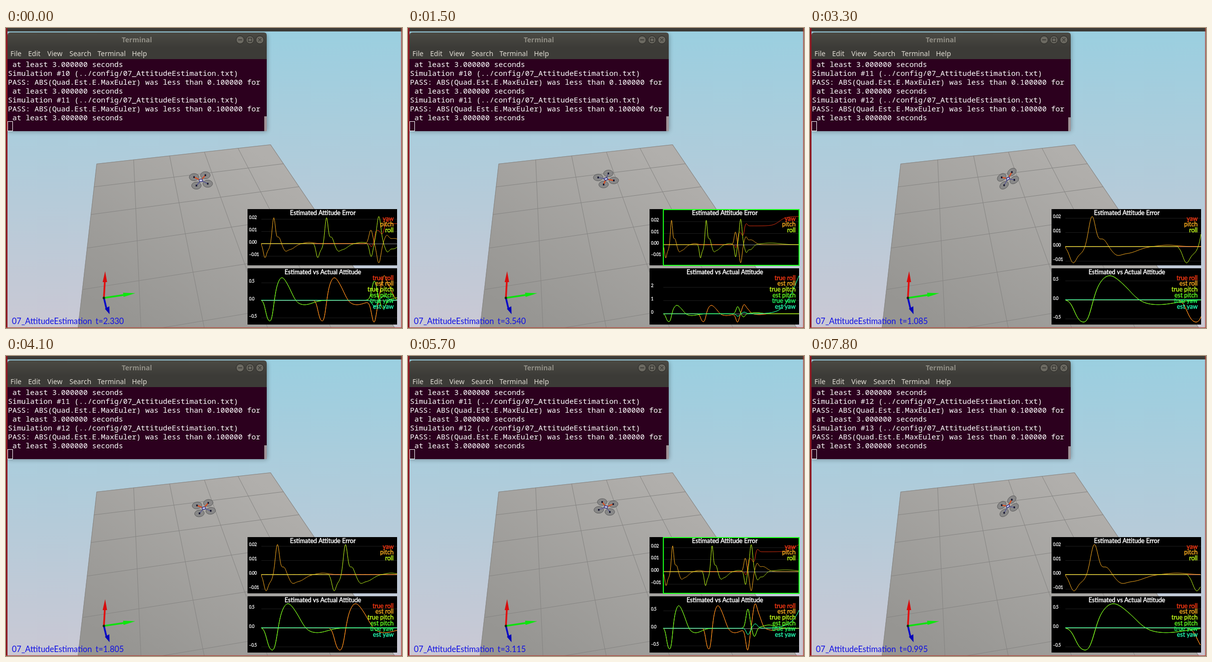
An HTML page with a canvas that plays this animation: 805x608 px, repeating every 7.9 s.

```html
<!DOCTYPE html>
<html lang="en">
<head>
<meta charset="utf-8">
<title>Attitude estimation</title>
<style>
  html, body { margin: 0; width: 100%; height: 100%; overflow: hidden; background: #b4ccd8; }
  svg, canvas { position: absolute; left: 0; top: 0; width: 805px; height: 608px; }
  .ui { font: 14px "Noto Sans", sans-serif; fill: #dfdbd2; }
  .title { font-weight: 700; fill: #908e85; text-anchor: middle; }
  .term text { font: 15px "Noto Sans Mono", monospace; fill: #fff; white-space: pre; }
</style>
</head>
<body>
<svg viewBox="0 0 805 608">
  <defs>
    <linearGradient id="sky" x2="0" y2="1">
      <stop stop-color="#9acfe0"/><stop offset="1" stop-color="#cac8d4"/>
    </linearGradient>
    <linearGradient id="floor" gradientUnits="userSpaceOnUse" x1="500" y1="240" x2="260" y2="608">
      <stop stop-color="#b1afac"/><stop offset="1" stop-color="#969592"/>
    </linearGradient>
    <linearGradient id="bar" x2="0" y2="1">
      <stop stop-color="#4b4a44"/><stop offset="1" stop-color="#3c3b37"/>
    </linearGradient>
    <filter id="shadow" x="-10%" y="-10%" width="120%" height="130%">
      <feGaussianBlur stdDeviation="5"/>
    </filter>
    <clipPath id="ground"><path d="M184 275L538 236L791 608H146Z"/></clipPath>
  </defs>
  <rect width="805" height="608" fill="url(#sky)"/>
  <g clip-path="url(#ground)" stroke="#868583" fill="none">
    <rect y="230" width="805" height="378" fill="url(#floor)" stroke="none"/>
    <path id="grid"/>
    <path d="M146 608L184 275L538 236L791 608" stroke-width="2"/>
  </g>
  <g stroke-width="3.5">
    <path d="M199 547L201 512" stroke="#e01010"/>
    <path d="M196.500 515L201.500 493L205.500 515Z" fill="#d80c0c"/>
    <path d="M199 547L204 568" stroke="#0808c8"/>
    <path d="M201 569L210.500 580L210 564Z" fill="#0404b8"/>
    <path d="M199 547L240 541" stroke="#10e010"/>
    <path d="M238 536.500L263 537.500L239 545Z" fill="#0ce80c"/>
  </g>
  <circle cx="199" cy="547" r="2.500" fill="#102810"/>

  <rect x="3" y="12" width="528" height="198" rx="5" fill="#000" opacity=".3" filter="url(#shadow)"/>
  <path d="M3 40V15Q3 9 9 9H524Q530 9 530 15V40Z" fill="url(#bar)"/>
  <rect x="3" y="39" width="527" height="24" fill="#3c3b37"/>
  <rect x="3" y="63" width="527" height="146" fill="#2c001e"/>
  <g fill="#6b6961" stroke="#33322e" stroke-width="1.300">
    <circle cx="476" cy="24" r="8"/><circle cx="496" cy="24" r="8"/><circle cx="516" cy="24" r="8"/>
    <path d="M472 24H480M492.500 20.500H499.500V27.500H492.500ZM513 21L519 27M519 21L513 27"/>
  </g>
  <text class="ui title" x="266" y="29">Terminal</text>
  <g class="ui">
    <text x="9" y="57">File</text><text x="45" y="57">Edit</text><text x="84" y="57">View</text>
    <text x="129" y="57">Search</text><text x="186" y="57">Terminal</text><text x="256" y="57">Help</text>
  </g>
  <g id="lines" class="term"></g>
  <rect x="3.500" y="189.500" width="10" height="19" fill="none" stroke="#fff"/>
  <rect id="thumb" x="525" y="179" width="5" height="30" fill="#a09498"/>
  <rect width="805" height="7" fill="#3c3b37"/>
  <path d="M1.500 0V608" stroke="#8c1620" stroke-width="3"/>
  <path d="M804 0V608M0 607.500H805" stroke="#b0483c" stroke-width="1.500"/>
</svg>
<canvas id="view" width="805" height="608"></canvas>
<script>
const LOOP = 7900, FRAME = 100;
const ctx = document.getElementById('view').getContext('2d');

// Floor grid in perspective; columns meet at (239, -204)
function floorGrid() {
  let d = '';
  for (let i = 1; i < 5; i++) {
    const x = (184 + 79.9 * i) / (1 + .017 * i), y = 275 - .11 * (x - 184);
    d += `M${x} ${y}L${x + (x - 239) / (y + 204) * (608 - y)} 608`;
  }
  for (let i = 1; i < 6; i++) {
    const depth = 1 - .0805 * i, left = (275 + 21.1 * i) / depth, right = (236 + 16.9 * i) / depth;
    d += `M${184 - .114 * (left - 275)} ${left}L${538 + .68 * (right - 236)} ${right}`;
  }
  return d;
}
document.getElementById('grid').setAttribute('d', floorGrid());

const bump = (t, centre, width, height) => height * Math.exp(-(((t - centre) / width) ** 2));
const rise = (t, centre, width, height) => height / 2 * (1 + Math.tanh((t - centre) / width));

// Response to one tilt manoeuvre: estimation error (1e-4 rad) and angle (rad)
const errPulse = t => t <= 0 ? 0 :
  bump(t, .062, .04, -112) + bump(t, .125, .04, -40) + bump(t, .214, .038, 211) +
  bump(t, .3, .045, 55) + bump(t, .41, .05, -30) + bump(t, .49, .12, -48) + bump(t, .82, .1, 10);
const tiltPulse = t => t <= 0 ? 0 :
  bump(t, .105, .055, -.42) + bump(t, .175, .055, -.52) + bump(t, .34, .12, .6) +
  bump(t, .48, .1, .22) + bump(t, .74, .2, -.13);

// Pitch manoeuvre, then roll, then a combined turn around t = 2
const pitchErr = t => 1e-4 * (errPulse(t) + bump(t, 1.88, .045, 110) + bump(t, 2.017, .05, -160) +
  bump(t, 2.15, .05, 50) + bump(t, 2.28, .14, 42));
const rollErr = t => 1e-4 * (errPulse(t - .905) + bump(t, 1.885, .04, -108) + bump(t, 2.017, .05, 222) +
  bump(t, 2.16, .05, -55) + bump(t, 2.27, .1, -45) + bump(t, 2.8, .35, 14));
const yawErr = t => 1e-4 * (bump(t, 1.89, .03, -26) + rise(t, 1.945, .02, 110) + bump(t, 2.07, .04, -32) +
  rise(t, 2.115, .02, 53) + bump(t, 2.165, .04, 20) + rise(t, 3.03, .17, 82));

const pitch = t => tiltPulse(t) + bump(t, 1.94, .06, .54) + bump(t, 2.09, .06, -.24) + bump(t, 2.42, .2, .09);
const roll = t => tiltPulse(t - .9) + bump(t, 1.935, .06, -.61) + bump(t, 2.1, .07, .62) +
  bump(t, 2.2, .08, .3) + bump(t, 2.5, .15, -.06);
const yaw = t => {
  const angle = bump(t, 1.945, .06, -.18) + bump(t, 2.11, .07, .12) + rise(t, 3.46, .33, 4.63);
  return angle > Math.PI ? angle - 2 * Math.PI : angle;
};

const droneX = t => 402.5 - bump(t, 2.25, .25, 7);
const droneY = t => 306 - bump(t, .5, .35, 11) + bump(t, 2.1, .4, 4);

// Simulated seconds; each run restarts the clock and slows down as plots fill
function playback(ms) {
  if (ms < 2100) return { run: 0, t: 2.33 + ms * 1.21 / 1500 };
  const run = ms < 6700 ? 1 : 2, s = (ms - (run === 1 ? 2100 : 6700)) / 1000;
  return { run, t: .005 + .9 * Math.min(s, 2) + .82 * Math.max(0, s - 2) };
}

function text(str, x, y, size, color, align = 'left', weight = .3) {
  ctx.font = `${size}px Lato, sans-serif`;
  ctx.textAlign = align;
  ctx.fillStyle = ctx.strokeStyle = color;
  ctx.fillText(str, x, y);
  if (weight) {
    ctx.lineWidth = weight;
    ctx.strokeText(str, x, y);
  }
}

function hline(y, color) {
  ctx.fillStyle = color;
  ctx.fillRect(519, Math.round(y), 276, 1);
}

const RED = '#ff3a14', ORANGE = '#ffb020', LIME = '#c4ff1c';
const errorPlot = {
  top: 367, title: 'Estimated Attitude Error',
  series: [['yaw', RED, yawErr], ['pitch', ORANGE, pitchErr], ['roll', LIME, rollErr]]
};
const attitudePlot = {
  top: 487, title: 'Estimated vs Actual Attitude',
  series: [
    ['true roll', RED, t => roll(t) - rollErr(t)], ['est roll', ORANGE, roll],
    ['true pitch', LIME, t => pitch(t) - pitchErr(t)], ['est pitch', '#62ff20', pitch],
    ['true yaw', '#1cff62', yaw], ['est yaw', '#24ffb4', yaw]
  ]
};

function tickStep(range) {
  let step = 1e-5;
  for (let i = 0; range / step > 6.4; i++) step *= i % 2 ? 2 : 5;
  return +step.toPrecision(1);
}

function drawPlot({ top, title, series }, now) {
  const times = [];
  for (let t = 0; t < now; t += .006) times.push(t);
  times.push(now);
  const data = series.map(([, , f]) => times.map(f));
  const all = data.flat();
  const min = Math.min(0, ...all), max = Math.max(0, ...all), range = Math.max(max - min, 1e-4);
  const toX = t => 519 + 276 * t / Math.max(now, 1);
  const toY = v => top + 109 - 94 * (v - min) / range;

  ctx.fillStyle = '#000';
  ctx.fillRect(491, top, 304, 114);
  const step = tickStep(range), digits = Math.max(0, -Math.floor(Math.log10(step) + 1e-9));
  ctx.letterSpacing = '-0.3px';
  for (let v = Math.ceil(min / step) * step; toY(v) > top + 12; v += step) {
    hline(toY(v), '#1c1c1c');
    text(v.toFixed(digits).replace('-', '–'), 494, toY(v), 8.5, '#fff');
  }
  ctx.letterSpacing = '0px';
  hline(toY(0), '#858585');

  ctx.save();
  ctx.beginPath();
  ctx.rect(491, top, 304, 114);
  ctx.clip();
  ctx.lineWidth = 1;
  ctx.lineJoin = 'round';
  data.forEach((values, i) => {
    ctx.strokeStyle = series[i][1];
    ctx.beginPath();
    values.forEach((v, j) => ctx.lineTo(toX(times[j]), toY(v)));
    ctx.stroke();
  });
  ctx.restore();

  text(title, 644, top + 12, 12.5, '#fff', 'center', .5);
  series.forEach(([name, color], i) => text(name, 788, top + 23.5 + 11.7 * i, 12.5, color, 'right', .4));
}

function drawDrone(t) {
  const mix = (a, p, b, q) => [a[0] * p + b[0] * q, a[1] * p + b[1] * q];
  const turn = (a, b, angle) => [
    mix(a, Math.cos(angle), b, Math.sin(angle)), mix(b, Math.cos(angle), a, -Math.sin(angle))];
  let front = [-2.5, -8], right = [11.5, -2], up = [0, -8.3];
  [front, right] = turn(front, right, yaw(t));
  [front, up] = turn(front, up, pitch(t));
  [up, right] = turn(up, right, roll(t));
  const cx = droneX(t), cy = droneY(t);
  const at = (r, f) => [cx + right[0] * r + front[0] * f, cy + right[1] * r + front[1] * f];
  const corners = [[-1, -1], [1, -1], [-1, 1], [1, 1]];

  for (const [r, f] of corners) {
    ctx.save();
    ctx.transform(...right, ...front, cx, cy);
    ctx.beginPath();
    ctx.arc(r, f, .83, 0, 7);
    ctx.restore();
    ctx.fillStyle = 'rgba(130,130,130,.85)';
    ctx.fill();
    ctx.strokeStyle = '#555';
    ctx.lineWidth = .9;
    ctx.stroke();
  }
  for (const [r, f] of corners) {
    const [x, y] = at(r, f);
    ctx.beginPath();
    ctx.moveTo(cx, cy);
    ctx.lineTo(x, y);
    ctx.strokeStyle = f > 0 ? '#e04c1c' : '#5a5a92';
    ctx.lineWidth = f > 0 ? 2.2 : 1.6;
    ctx.stroke();
    ctx.fillStyle = '#14142c';
    ctx.fillRect(x - 1.5, y - 1.8, 3, 3.6);
  }
  ctx.beginPath();
  [[-.28, -.28], [.28, -.28], [.28, .28], [-.28, .28]].forEach(([r, f]) => ctx.lineTo(...at(r, f)));
  ctx.closePath();
  ctx.fillStyle = '#c4c4f0';
  ctx.fill();
  ctx.strokeStyle = '#24246c';
  ctx.lineWidth = 1.2;
  ctx.stroke();
}

let shownRun = -1;
function showTerminal(run) {
  if (run === shownRun) return;
  shownRun = run;
  const held = '\u00a0at least 3.000000 seconds';
  const report = n => [`Simulation #${n} (../config/07_AttitudeEstimation.txt)`,
    'PASS: ABS(Quad.Est.E.MaxEuler) was less than 0.100000 for', held];
  document.getElementById('lines').innerHTML = [held, ...report(10 + run), ...report(11 + run)]
    .map((line, i) => `<text x="4" y="${79 + 18 * i}">${line}</text>`).join('');
  const thumb = document.getElementById('thumb');
  thumb.setAttribute('y', 179 + 2 * run);
  thumb.setAttribute('height', 30 - 2 * run);
}

function draw(clock) {
  const { run, t: exact } = playback(Math.floor(clock % LOOP / FRAME) * FRAME);
  const t = Math.round(exact * 200) / 200;
  showTerminal(run);
  ctx.clearRect(0, 0, 805, 608);
  drawDrone(t);
  drawPlot(errorPlot, t);
  if (t >= 3) {
    ctx.strokeStyle = '#18ff18';
    ctx.lineWidth = 2;
    ctx.strokeRect(519, 368, 276, 113);
  }
  drawPlot(attitudePlot, t);
  text('07_AttitudeEstimation', 12, 600, 16.5, '#1010e4', 'left', 0);
  text(`t=${t.toFixed(3)}`, 182, 600, 16.5, '#1010e4', 'left', 0);
}

const start = performance.now();
function tick() {
  draw(performance.now() - start);
  requestAnimationFrame(tick);
}
tick();
</script>
</body>
</html>
```
